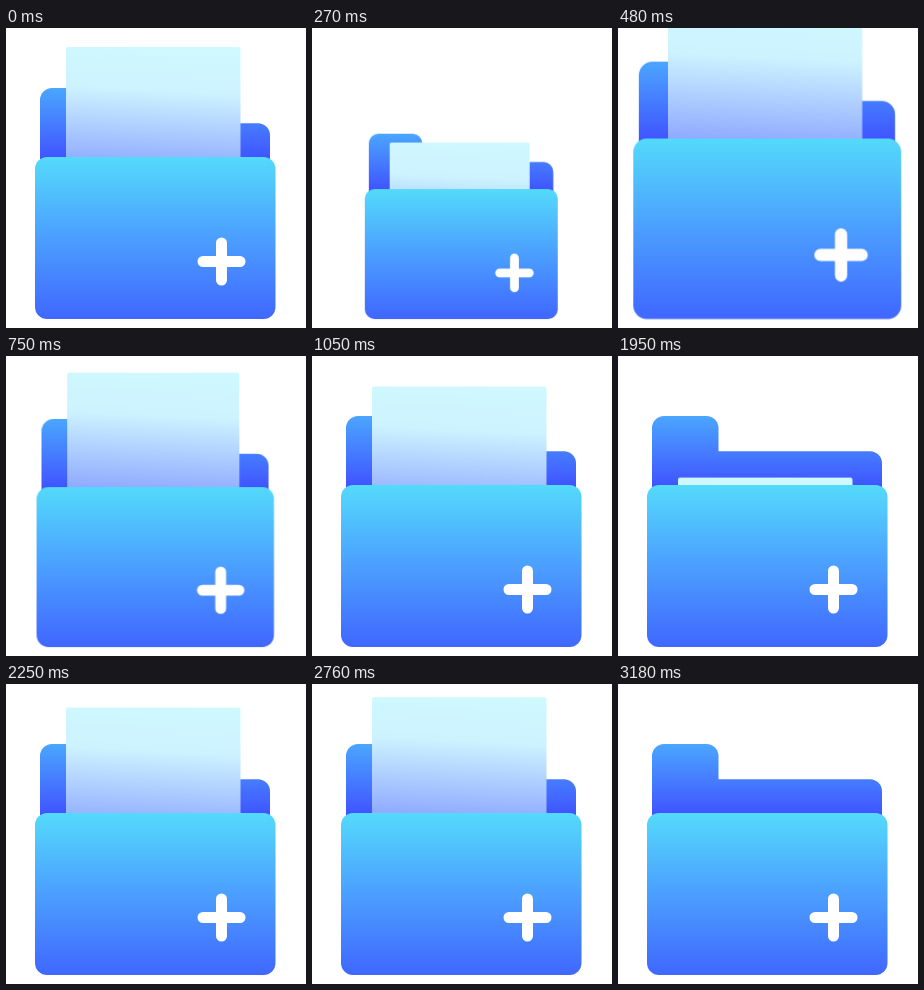
An HTML page for the animation above (3.61 s loop, 300x300 px).

```html
<!DOCTYPE html>
<html lang="en">
<head>
<meta charset="utf-8">
<title>Folder</title>
<style>
  html, body { margin: 0; width: 100%; height: 100%; overflow: hidden; background: #fff; }
  svg { display: block; width: 100vw; height: 100vh; }

  .folder { transform-origin: 149.4px 291px; animation: bounce 3610ms infinite; }
  .paper { animation: slide 3610ms infinite; }

  @keyframes bounce {
    0% { transform: scale(1); animation-timing-function: ease-in-out; }
    7.48% { transform: scale(.802); animation-timing-function: ease-in-out; }
    12.2% { transform: scale(1.125); animation-timing-function: ease-in-out; }
    18.3% { transform: scale(.965); animation-timing-function: ease-in-out; }
    23.5% { transform: scale(1.012); animation-timing-function: ease-in-out; }
    28%, 100% { transform: scale(1); }
  }

  /* Dip, pop out, peek, pop out again, then close. */
  @keyframes slide {
    0% { transform: translateY(6px); animation-timing-function: ease-in-out; }
    7.48% { transform: translateY(58px); animation-timing-function: ease-in-out; }
    12.2% { transform: translateY(0); }
    24.1% { transform: translateY(0); animation-timing-function: cubic-bezier(.33, 0, .67, .33); }
    36.57% { transform: translateY(109px); }
    54.02% { transform: translateY(109px); animation-timing-function: cubic-bezier(.25, .5, .45, 1); }
    67.31% { transform: translateY(0); }
    76.04% { transform: translateY(0); animation-timing-function: cubic-bezier(.33, 0, .67, .33); }
    88.09%, 100% { transform: translateY(120px); }
  }
</style>
</head>
<body>
<svg viewBox="0 0 300 300">
  <defs>
    <linearGradient id="back" gradientUnits="userSpaceOnUse" x1="0" y1="60" x2="0" y2="130">
      <stop offset="0" stop-color="#4ba6ff"/>
      <stop offset="1" stop-color="#4054ff"/>
    </linearGradient>
    <linearGradient id="sheet" gradientUnits="userSpaceOnUse" x1="150" y1="13" x2="144" y2="133">
      <stop offset="0" stop-color="#cff8ff"/>
      <stop offset=".36" stop-color="#cdf3ff"/>
      <stop offset="1" stop-color="#8faaff"/>
    </linearGradient>
    <linearGradient id="front" x1="0" y1="0" x2="0" y2="1">
      <stop offset="0" stop-color="#54dafb"/>
      <stop offset=".5" stop-color="#4b9fff"/>
      <stop offset="1" stop-color="#4067ff"/>
    </linearGradient>
  </defs>
  <g class="folder">
    <path fill="url(#back)" d="M34 150V72a12 12 0 0 1 12-12H88.500a12 12 0 0 1 12 12V95.300H252a12 12 0 0 1 12 12V150Z"/>
    <rect class="paper" x="60" y="13" width="174.500" height="150" rx="2" fill="url(#sheet)"/>
    <rect x="29" y="129" width="240.500" height="162" rx="12" fill="url(#front)"/>
    <path d="M197 233.500H234M215.500 215V252" stroke="#fff" stroke-width="11" stroke-linecap="round"/>
  </g>
</svg>
</body>
</html>
```
